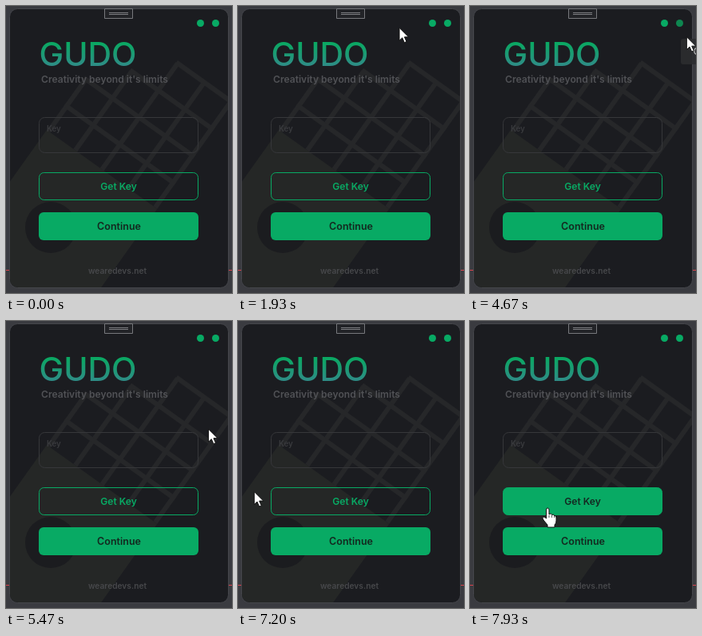
Animation, 283 px wide and 359 px high, one loop 8 s. Source, as an HTML page with a canvas:

```html
<!DOCTYPE html>
<html lang="en">
<head>
<meta charset="utf-8">
<title>Key window</title>
<style>
html, body { margin: 0; width: 100%; height: 100%; overflow: hidden; background: #3a3b40; }
canvas { display: block; width: 283px; height: 359px; }
</style>
</head>
<body>
<canvas id="stage"></canvas>
<script>
const W = 283, H = 359, LOOP = 8000;
const GREEN = [8, 170, 100], CARD = [27, 28, 32];
const TILT = 0.62;
const canvas = document.getElementById('stage');
const ctx = canvas.getContext('2d');
const dpr = window.devicePixelRatio || 1;
canvas.width = W * dpr;
canvas.height = H * dpr;

// Pointer strokes: each starts where the last one ended, bent towards `via`
const entry = [265, 77];
const strokes = [
  { from: 330, until: 930, to: [128, 57], via: [190, 72] },
  { from: 1270, until: 1330, to: [148, 47] },
  { from: 1470, until: 2270, to: [243, 17], via: [193, 26] },
  { from: 2730, until: 3130, to: [245, 28] },
  { from: 3130, until: 3530, to: [269, 28], via: [268, 88] },
  { from: 3530, until: 3870, to: [264, 22] },
  { from: 4530, until: 4670, to: [271, 38] },
  { from: 4670, until: 5330, to: [266, 131], via: [213, 88] },
  { from: 5400, until: 6130, to: [122, 166], via: [200, 150] },
  { from: 6270, until: 6400, to: [104, 166] },
  { from: 6670, until: 7000, to: [4, 198] },
  { from: 7000, until: 7530, to: [81, 231], via: [14, 220] },
  { from: 7530, until: 7930, to: [97, 234] }
];

const clamp = v => Math.max(0, Math.min(1, v));
const mix = (a, b, p) => a + (b - a) * p;
const mixAll = (a, b, p) => a.map((v, i) => mix(v, b[i], p));
const rgb = (c, alpha = 1) => `rgba(${c.map(Math.round).join(',')},${alpha})`;
const blend = (a, b, p) => rgb(mixAll(a, b, p));
const fade = (t, on, off, span) => clamp((t - on) / span) * (1 - clamp((t - off) / span));

function pointerAt(t) {
  let pos = entry;
  for (const { from, until, to, via } of strokes) {
    if (t < from) break;
    const p = clamp((t - from) / (until - from));
    pos = via ? mixAll(mixAll(pos, via, p), mixAll(via, to, p), p) : mixAll(pos, to, p);
  }
  return pos;
}

function box(x, y, w, h, r, fill, stroke) {
  ctx.beginPath();
  ctx.roundRect(x, y, w, h, r);
  if (fill) { ctx.fillStyle = fill; ctx.fill(); }
  if (stroke) { ctx.strokeStyle = stroke; ctx.lineWidth = 1; ctx.stroke(); }
}

function dot(x, y, r, color) {
  ctx.beginPath();
  ctx.arc(x, y, r, 0, Math.PI * 2);
  ctx.fillStyle = color;
  ctx.fill();
}

function text(str, x, y, size, color, weight = 500, align = 'left') {
  ctx.font = `${weight} ${size}px Inter, sans-serif`;
  ctx.textAlign = align;
  ctx.fillStyle = color;
  ctx.fillText(str, x, y);
}

function line(x1, y1, x2, y2) {
  ctx.beginPath();
  ctx.moveTo(x1, y1);
  ctx.lineTo(x2, y2);
  ctx.stroke();
}

// Tilted slab with a stepped lattice standing on its top edge
function backdrop() {
  const width = 170, cell = 41.5, edge = 3;
  ctx.save();
  ctx.beginPath();
  ctx.roundRect(5, 4, 273, 348, 10);
  ctx.clip();
  ctx.translate(51, 155);
  ctx.rotate(TILT);
  ctx.fillStyle = '#252726';
  ctx.fillRect(0, 0, width, 400);
  ctx.strokeStyle = '#262729';
  ctx.lineWidth = 6;
  for (let i = 0; i <= 4; i++) {
    const x = edge + i * (width - 2 * edge) / 4;
    line(x, -Math.min(i + 2, 4) * cell + edge, x, 0);
    if (i) line(Math.max(0, i - 2) * cell, edge - i * cell, width, edge - i * cell);
  }
  ctx.restore();
  dot(56, 277, 32, '#1b1c1f');
}

function frame() {
  ctx.fillStyle = '#3a3b40';
  ctx.fillRect(0, 0, W, H);
  ctx.fillStyle = '#d8424c';
  ctx.fillRect(0, 330, W, 1);
  box(4.5, 3.5, 274, 349, 10, rgb(CARD), '#45464b');
  backdrop();

  box(123.5, 3.5, 35, 12, 0, '#222327', '#77787c');
  ctx.fillStyle = '#7d7e82';
  ctx.fillRect(129, 8, 24, 1);
  ctx.fillRect(129, 10, 24, 1);
}

function title() {
  const g = ctx.createLinearGradient(0, 46, 0, 76);
  g.addColorStop(0, '#0aa862');
  g.addColorStop(1, '#308b88');
  text('GUDO', 41.5, 75, 41, g);
  text("Creativity beyond it's limits", 44, 96, 12.1, '#515256', 600);
}

function controls(t) {
  const dim = [17, 120, 72];
  dot(243.5, 21.5, 4.5, blend(GREEN, dim, fade(t, 2270, 3180, 240)));
  dot(262.5, 21.5, 4.5, blend(GREEN, dim, fade(t, 3560, 4600, 240)));

  const focus = fade(t, 5590, 6820, 250);
  box(41.5, 139.5, 199, 44, 7, null, blend([54, 55, 58], [174, 174, 174], focus));
  text('Key', 51, 156.5, 9.8, blend([57, 58, 61], [166, 166, 166], focus), 600);

  // Fill runs from transparent white to solid green
  const p = clamp((t - 7345) / 270);
  const fill = GREEN.map(c => mix(255, c, p));
  box(41.5, 208.5, 199, 34, 6, rgb(fill, Math.sqrt(p)), rgb(GREEN));
  text('Get Key', 141, 230, 12.1, blend(GREEN, [20, 40, 33], p), 600, 'center');

  box(41, 258, 200, 35, 6, rgb(GREEN));
  text('Continue', 141.5, 280, 12.5, '#14281f', 600, 'center');
  text('wearedevs.net', 139.5, 335, 10.2, '#47484b', 600, 'center');
}

function tooltip(t) {
  ctx.globalAlpha = fade(t, 4070, 4650, 200);
  box(264, 41, 60, 32, 3, '#2c2d2f');
  text('Close', 279.5, 61, 12, '#c4c4c4');
  ctx.globalAlpha = 1;
}

function shape(d) {
  const s = new Path2D(d);
  ctx.lineJoin = 'round';
  ctx.fillStyle = '#fff';
  ctx.strokeStyle = '#111';
  ctx.lineWidth = 1;
  ctx.fill(s);
  ctx.stroke(s);
}

function beam() {
  ctx.lineCap = 'square';
  for (const [color, width] of [['#111', 2.6], ['#fff', 1.2]]) {
    ctx.strokeStyle = color;
    ctx.lineWidth = width;
    line(0, -7, 0, 7);
    line(-2.5, -7.3, 2.5, -7.3);
    line(-2.5, 7.3, 2.5, 7.3);
  }
}

function hand() {
  shape('M-1.5 13V2Q-1.5 0 .2 0T2 2V8Q5 6 5.5 8.5Q8 7 8.5 9.5Q11 9 11 12V16Q11 19 9 21V24H0V21L-5 15Q-7 12-5 11Q-3 11-1.5 13Z');
  ctx.lineWidth = 0.7;
  for (const x of [2, 5.5, 8.5]) line(x, 9, x, 12);
}

function pointer(t) {
  if (t < strokes[0].from) return;
  const [x, y] = pointerAt(t);
  const across = x > 41 && x < 241;
  ctx.save();
  ctx.translate(x, y);
  if (across && y > 139 && y < 184) beam();
  else if (across && y > 208 && y < 243) hand();
  else shape('M.5 .5V16.5L4.2 13L6.8 19L9.5 17.8L6.9 12H12Z');
  ctx.restore();
}

const start = performance.now();

function draw() {
  const t = (performance.now() - start) % LOOP;
  ctx.setTransform(dpr, 0, 0, dpr, 0, 0);
  frame();
  title();
  controls(t);
  tooltip(t);
  pointer(t);
  requestAnimationFrame(draw);
}
draw();
</script>
</body>
</html>
```
